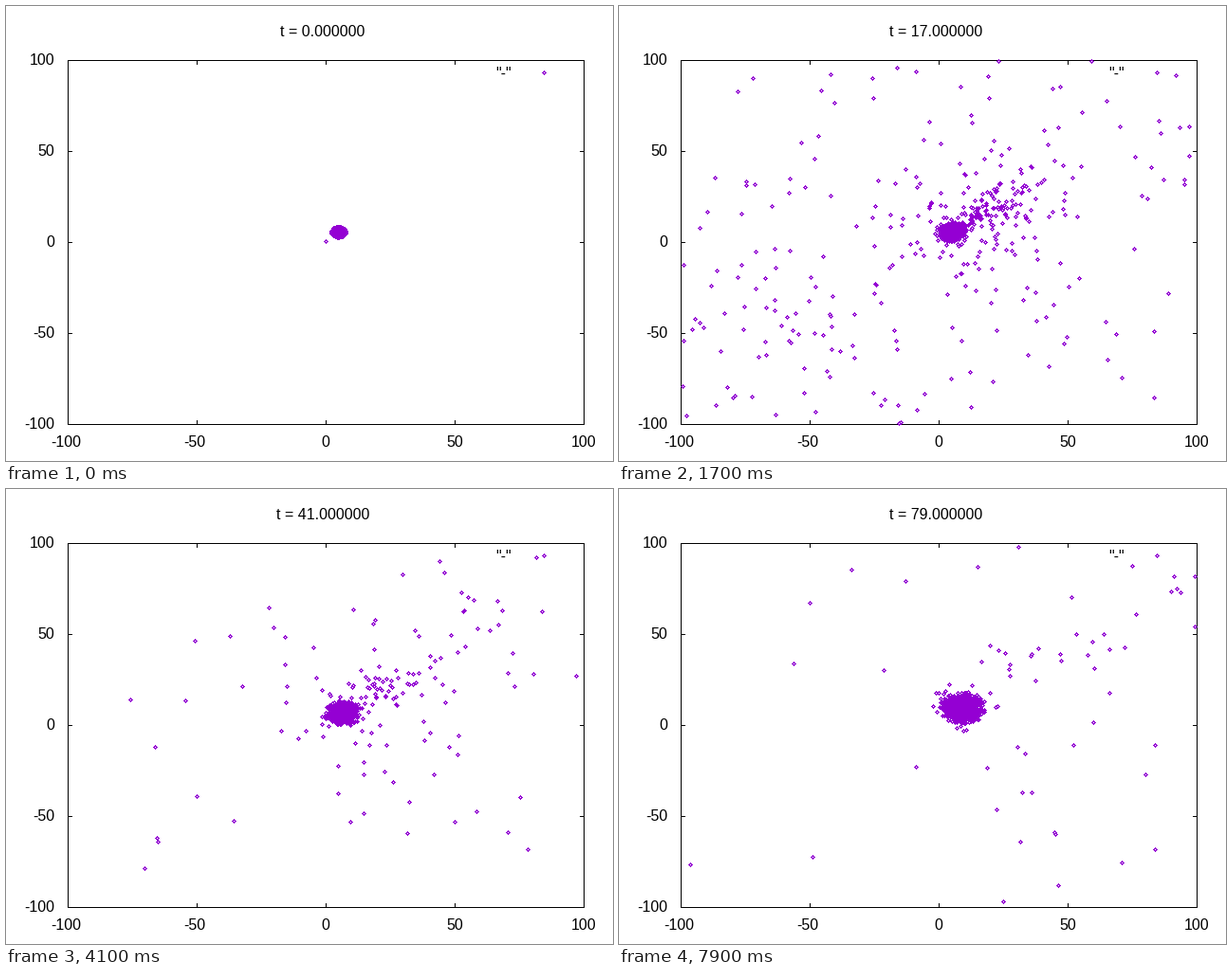
Animation, 640 px wide and 480 px high, one loop 8 s. Source, as a matplotlib script:

```python
import numpy as np
import matplotlib.pyplot as plt
from matplotlib.animation import FuncAnimation

FRAMES, STEP_MS = 80, 100
W, H, DPI = 640, 480, 100
LEFT, RIGHT, TOP, BOTTOM = 65, 609, 57, 441
PURPLE = "#9400D3"
PX = 72 / DPI  # points per pixel
TURN = 2 * np.pi
LAST = FRAMES - 1

N_CORE, N_FALL, N_FAST, N_SLOW = 380, 170, 800, 85
N = N_CORE + N_FALL + N_FAST + N_SLOW
fall = slice(N_CORE, N_CORE + N_FALL)
fast = slice(fall.stop, fall.stop + N_FAST)
slow = slice(fast.stop, N)

rng = np.random.default_rng(11)


def polar(r, a):
    return np.column_stack((r * np.cos(a), r * np.sin(a)))


def angles(n, *lobes):
    """Uniform directions, with lobes given as (share, mean, spread)."""
    a = rng.uniform(0, TURN, n)
    pick = rng.random(n)
    low = 0
    for share, mean, spread in lobes:
        inside = (pick >= low) & (pick < low + share)
        a = np.where(inside, rng.normal(mean, spread, n), a)
        low += share
    return a


# Starting disc with one outlier at the origin.
disc = 5 + polar(2.8 * np.sqrt(rng.random(N)), angles(N))
disc[0] = 0

# Bound elliptical orbits.
size = rng.random(N) ** 0.55
size[rng.random(N) < 0.07] *= 1.6
flat = rng.uniform(0.4, 1, N)
phase, tilt = rng.uniform(0, TURN, (2, N))
omega = rng.choice([-1, 1], N) * 0.9 / (size + 0.3)

# Particles thrown out that later drop back.
period = 10 + 55 * rng.random(N_FALL) ** 1.5
reach = 2.6 * period ** (2 / 3) * rng.uniform(0.4, 1.3, N_FALL)
fall_launch = rng.uniform(0.5, 5, N_FALL)
fall_angle = angles(N_FALL, (0.5, 0.72, 0.25))

# Fast ejecta, strongest towards the lower left.
speed = 2 + 16 * rng.random(N_FAST) ** 0.7
fast_launch = rng.uniform(0.5, 2.2, N_FAST)
fast_angle = angles(N_FAST, (0.26, 3.95, 0.36), (0.06, 0.6, 0.3))

# Slow escapers: late ones coast, early ones are still losing speed.
T_REF = 65
span = rng.uniform(18, 130, N_SLOW)
age = rng.uniform(38, 140, N_SLOW)
slow_angle = angles(N_SLOW, (0.5, 0.72, 0.3), (0.2, -0.95, 0.35))


def centre(t):
    return 4.8 + 4.2 * (t / LAST) ** 1.5


def orbits(t):
    a = phase + omega * t
    u, v = size * np.cos(a), size * flat * np.sin(a)
    x = u * np.cos(tilt) - v * np.sin(tilt)
    y = u * np.sin(tilt) + v * np.cos(tilt)
    # The young core is stretched along the diagonal.
    s = np.exp(-t / 12)
    along, across = (x + y) / 2 * (1 + 0.6 * s), (x - y) / 2 * (1 - 0.4 * s)
    radius = 4.4 + 4.6 * t / LAST
    return radius * np.column_stack((along + across, along - across))


def positions(t):
    if t == 0:
        return disc
    c = centre(t)
    pos = c + orbits(t)

    k = (t - fall_launch) / period
    r = reach * np.sin(np.pi * np.clip(k, 0, 1)) ** (2 / 3)
    away = ((k > 0) & (k < 1))[:, None]
    pos[fall] = np.where(away, c + polar(r, fall_angle), pos[fall])

    dt = t - fast_launch
    gone = (dt > 0)[:, None]
    pos[fast] = np.where(gone, c + polar(1 + speed * dt, fast_angle), disc[fast])

    coast = (t - T_REF + age) / age
    brake = (t / T_REF) ** (T_REF / age) * min(1, t / 6)
    k = np.where(age < T_REF, coast, brake)
    out = c + polar(span * k, slow_angle)
    pos[slow] = np.where((k > 0)[:, None], out, pos[slow])
    return pos


# Small diamond with a one-pixel hole.
DIAMOND = np.array([(x, y) for x in range(-2, 3) for y in range(-2, 3)
                    if 0 < x * x + y * y <= 4])


def marker_pixels(pos):
    seen = pos[(np.abs(pos) <= 100).all(axis=1)]
    px = np.rint(np.column_stack((337 + 2.72 * seen[:, 0],
                                  249 - 1.92 * seen[:, 1])))
    px = np.vstack((px, (567, 71)))
    return (px[:, None] + DIAMOND).reshape(-1, 2).T + 0.2


plt.rcParams["font.family"] = "Liberation Sans"
fig = plt.figure(figsize=(W / DPI, H / DPI), dpi=DPI, facecolor="white")
ax = fig.add_axes([0, 0, 1, 1])
ax.set(xlim=(0, W), ylim=(H, 0))
ax.axis("off")


def line(xs, ys):
    # Snapping moves each coordinate to the centre of its pixel.
    ax.plot(np.array(xs) + 0.1, np.array(ys) + 0.1, color="black", lw=PX,
            antialiased=False, snap=True, solid_capstyle="projecting",
            solid_joinstyle="miter")


def label(x, y, s, ha="center"):
    return ax.text(x, y, s, ha=ha, va="baseline", fontsize=16 * PX,
                   color="black")


line([LEFT, RIGHT, RIGHT, LEFT, LEFT], [TOP, TOP, BOTTOM, BOTTOM, TOP])
for i, value in enumerate(range(-100, 101, 50)):
    x, y = LEFT + 136 * i, BOTTOM - 96 * i
    line([x, x], [TOP, TOP + 4])
    line([x, x], [BOTTOM - 4, BOTTOM])
    line([LEFT, LEFT + 4], [y, y])
    line([RIGHT - 4, RIGHT], [y, y])
    label(x - 2 * (value < 0), 465, str(value))
    label(51, y + 5, str(value), "right")
label(533, 76, '"-"', "right")
title = label(334, 32, "")
dots, = ax.plot([], [], ",", color=PURPLE, zorder=5)


def update(t):
    title.set_text(f"t = {t:.6f}")
    dots.set_data(*marker_pixels(positions(t)))
    return title, dots


anim = FuncAnimation(fig, update, frames=FRAMES, interval=STEP_MS,
                     repeat=True, repeat_delay=0, blit=False)
plt.show()
```
